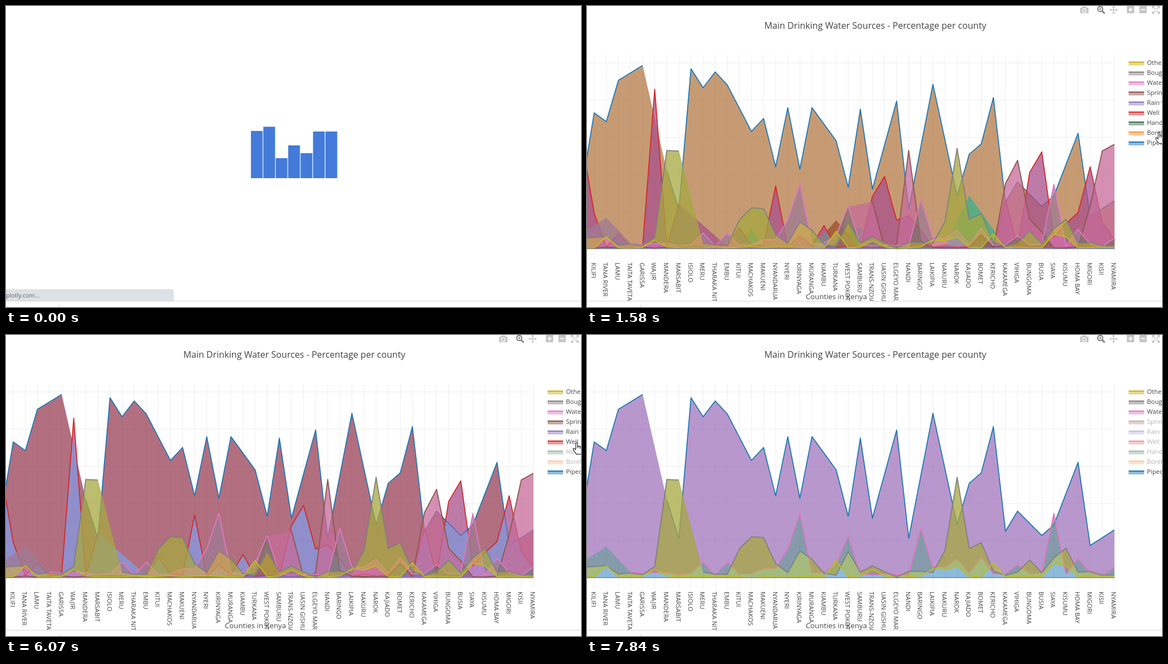
An HTML page with a canvas that plays this animation: 1033 px wide and 542 px high, repeating every 8000 ms.

```html
<!DOCTYPE html>
<html lang="en">
<head>
<meta charset="utf-8">
<title>Drinking water chart</title>
<style>
html, body { margin: 0; width: 100%; height: 100%; overflow: hidden; background: #fff; }
canvas { display: block; width: 1033px; height: 542px; }
</style>
</head>
<body>
<canvas id="stage"></canvas>
<script>
const W = 1033, H = 542, LOOP = 8000;
const BASE = 437, UNIT = 3.35, RIGHT = 948;
const OPEN = '"Open Sans", sans-serif';
const ARIAL = '"Liberation Sans", Arial, sans-serif';

const canvas = document.getElementById('stage');
const dpr = window.devicePixelRatio || 1;
canvas.width = W * dpr;
canvas.height = H * dpr;
const c = canvas.getContext('2d');

const counties = ('KWALE,KILIFI,TANA RIVER,LAMU,TAITA TAVETA,GARISSA,WAJIR,MANDERA,MARSABIT,ISIOLO,MERU,' +
  'THARAKA NITHI,EMBU,KITUI,MACHAKOS,MAKUENI,NYANDARUA,NYERI,KIRINYAGA,MURANGA,KIAMBU,TURKANA,' +
  'WEST POKOT,SAMBURU,TRANS-NZOIA,UASIN GISHU,ELGEYO MARAKWET,NANDI,BARINGO,LAIKIPIA,NAKURU,NAROK,' +
  'KAJIADO,BOMET,KERICHO,KAKAMEGA,VIHIGA,BUNGOMA,BUSIA,SIAYA,KISUMU,HOMA BAY,MIGORI,KISII,NYAMIRA').split(',');
const px = i => 13 + 21.73 * (i - 1);
const py = v => BASE - UNIT * v;
const _ = null;

let seed = 7;
function random() {
  seed = seed * 16807 % 2147483647;
  return seed / 2147483647;
}

// Percentages per county: straight runs between turning points.
function joined(turns) {
  const at = Object.keys(turns).map(Number);
  return counties.map((name, i) => {
    if (i in turns) return turns[i];
    const a = at.filter(k => k < i).pop(), b = at.find(k => k > i);
    return turns[a] + (turns[b] - turns[a]) * (i - a) / (b - a);
  });
}

// Percentages per county: a low random level with a few peaks; null is a missing value.
const peaked = (level, peaks) =>
  counties.map((name, i) => i in peaks ? peaks[i] : level * (0.5 + random()));

const piped = joined({ 0: 34, 1: 73, 2: 68.3, 3: 90.5, 5: 98.5, 6: _, 7: 41.8, 8: 21, 9: 96.7, 10: 86.5, 11: 95,
  12: 88, 14: 63, 15: 70, 16: 44, 17: 75.8, 18: 42.7, 19: 75.8, 21: 58, 22: 33, 23: 75, 24: 32, 26: 79.36, 27: 21.2,
  29: 88.4, 31: 28.4, 32: 50.7, 33: 56.4, 34: 81.2, 35: 25, 36: 35.8, 38: 22.7, 39: 28.4, 41: 62, 42: 17.3, 44: 25.7 });
const borehole = peaked(0.8, { 14: 12, 20: _, 21: _, 22: _, 23: 11.5, 24: _, 26: _, 31: _, 32: 28.7, 33: _, 34: _ });
const handpump = peaked(0.5, { 20: _, 21: 15.3, 22: _, 26: _ });
const well = peaked(1.3, { 0: 57, 1: 19, 3: 8, 6: 85.7, 8: 24, 9: _, 10: _, 11: _, 13: 11.3, 16: 33.7, 18: 7, 20: 12.5,
  24: 28, 25: 38.8, 26: 15.31, 27: 17.6, 28: 10, 33: 7.8, 35: 26.6, 37: 41, 38: 52, 39: 6, 40: 13.4, 41: 19.4, 42: 44, 43: 14, 44: 5 });
const rain = peaked(0.5, { 26: 0.71 });
const spring = peaked(0.6, { 21: 2.7, 22: 22.4, 23: _, 24: 25.4, 26: 2.49, 27: 52.8, 28: 4, 33: 7.5,
  35: 35, 36: 47.5, 37: 15.8, 38: 9, 42: 23, 43: 52.5, 44: 56.1 });
const water = peaked(2, { 0: 8.4, 1: _, 2: 16.7, 3: _, 10: 8.4, 12: 8.4, 15: 4.8, 16: 5, 17: 15.5, 18: 34.6, 21: 7.5,
  22: 22.7, 26: 1.75, 28: 26.6, 29: 5.7, 30: 5.7, 31: 10, 33: 11, 36: 7, 39: 34.6, 41: 10.4, 44: 5.7 });
const bought = peaked(2.4, { 0: 5.7, 1: 6, 2: 6.5, 6: 6, 7: 52.8, 8: 52.5, 9: _, 13: 15.5, 14: 22, 15: 21.5, 16: 7.5,
  18: 14.3, 19: 10, 22: 14, 24: 6.3, 26: 0.36, 30: 14.6, 31: 54, 32: 15.8, 33: 18.8, 37: 9.5, 39: 10.7, 40: 15.8 });
const other = peaked(0.7, { 2: 6.5, 6: 4.5, 21: 9.3, 24: 4.2, 26: 0.02, 29: 4.8, 30: 4.2, 31: 6.3, 34: 8, 39: 7.8, 40: 6.3 });

// off: moment the trace is switched off in the legend
const trace = (name, color, key, data, off = Infinity) => ({ name, color, key, data, off });
const traces = [
  trace('Piped water', '#1f77b4', '#1f77b4', piped),
  trace('Borehole', '#ff7f0e', '#f5913c', borehole, 1730),
  trace('Handpump', '#2ca02c', '#3f6f52', handpump, 5490),
  trace('Well', '#d62728', '#d62f2f', well, 6230),
  trace('Rain water', '#9467bd', '#8d78c0', rain, 6850),
  trace('Spring', '#8c564b', '#8c564b', spring, 7350),
  trace('Water bodies', '#e377c2', '#dd7cc4', water),
  trace('Bought from vendors', '#7f7f7f', '#8a8088', bought),
  trace('Other', '#bcbd22', '#cdb01e', other)
];

const move = (kind, from, to, start, end) => ({ kind, from, to, start, end });
const moves = [
  move('cross', 630, 1180, [600, 250], [906, 312]),
  move('hand', 1460, 1780, [1021, 226], [1021, 226]),
  move('arrow', 1780, 1920, [1021, 226], [1021, 311]),
  move('none', 5140, 5490, [0, 0], [0, 0]),
  move('hand', 5490, 7060, [1016, 213], [1023, 153]),
  move('hand', 7500, 7790, [1025, 146], [1025, 136]),
  move('none', 7840, LOOP, [0, 0], [0, 0])
];

// The screen refreshes in short steps.
const tick = t => 60 + 70 * Math.floor((t - 60) / 70);
const ramp = (t, a, b) => Math.max(0, Math.min(1, (t - a) / (b - a)));

function text(s, x, y, size, color, o = {}) {
  c.font = `${o.weight || 400} ${size}px ${o.font || OPEN}`;
  c.textAlign = o.align || 'left';
  c.textBaseline = o.base || 'alphabetic';
  c.fillStyle = color;
  c.fillText(s, x, y);
}

function rect(x, y, w, h, color) {
  c.fillStyle = color;
  c.fillRect(x, y, w, h);
}

function poly(points, fill, stroke, width = 1) {
  c.beginPath();
  points.forEach(p => c.lineTo(p[0], p[1]));
  c.closePath();
  if (fill) { c.fillStyle = fill; c.fill(); }
  if (stroke) { c.strokeStyle = stroke; c.lineWidth = width; c.stroke(); }
}

function lines(list, color, width) {
  c.beginPath();
  list.forEach(([x1, y1, x2, y2]) => { c.moveTo(x1, y1); c.lineTo(x2, y2); });
  c.strokeStyle = color;
  c.lineWidth = width;
  c.stroke();
}

function loader() {
  [85, 92.5, 36, 59, 45, 84, 84].forEach((h, i) => {
    const x = 440 + i * 22.33;
    rect(x, 310 - h, 21.8, h, '#b9def3');
    rect(x, 310 - h, 20.8, h, '#447ad9');
  });
  c.beginPath();
  c.roundRect(-5, 510, 306.5, 21, [0, 4, 0, 0]);
  c.fillStyle = '#dee1e6';
  c.fill();
  text('plotly.com...', 0, 525, 10.7, '#5f6368');
}

function grid() {
  const list = [];
  for (let i = 1; i < counties.length; i++) list.push([px(i), 88, px(i), 456]);
  for (let k = 0; k < 6; k++) list.push([0, 102.5 + 67 * k, RIGHT, 102.5 + 67 * k]);
  lines(list, '#eeeeee', 1);
}

const points = data => data.map((v, i) => v === null ? null : [px(i), py(v)]).filter(Boolean);

function area(top, bottom, color) {
  c.globalAlpha = 0.5;
  poly(points(top).concat(points(bottom).reverse()), color);
  c.globalAlpha = 1;
}

function curve(tr) {
  c.beginPath();
  let pen = false;
  tr.data.forEach((v, i) => {
    if (v !== null) c[pen ? 'lineTo' : 'moveTo'](px(i), py(v));
    pen = v !== null;
  });
  c.strokeStyle = tr.color;
  c.lineWidth = 1.8;
  c.stroke();
}

function plot(shown) {
  c.save();
  c.beginPath();
  c.rect(0, 87, RIGHT, 370);
  c.clip();
  area(shown[0].data, counties.map(() => 0), shown[0].color);
  shown.forEach((tr, k) => {
    const next = shown[k + 1];
    if (next) area(tr.data, next.data, next.color);
    curve(tr);
  });
  rect(0, BASE - 0.5, RIGHT, 1, '#66667a');
  c.restore();
}

function labels() {
  text('Main Drinking Water Sources - Percentage per county', 518, 41, 16.07, '#444', { align: 'center' });
  c.save();
  c.beginPath();
  c.rect(0, 450, W, 81);
  c.clip();
  for (let i = 1; i < counties.length; i++) {
    c.save();
    c.translate(px(i) - 5.3, 462);
    c.rotate(Math.PI / 2);
    text(counties[i], 0, 0, 11.3, '#444');
    c.restore();
  }
  text('Counties in Kenya', 448, 528, 13.2, '#444', { align: 'center' });
  c.restore();
}

function legend(t) {
  traces.forEach((tr, k) => {
    const y = 246 - 18 * k, hidden = t >= tr.off;
    c.globalAlpha = hidden ? 0.25 : 0.5;
    rect(973, y - 1, 28, 6, tr.key);
    c.globalAlpha = hidden ? 0.4 : 1;
    rect(973, y - 2, 28, 2, tr.key);
    text(tr.name, 1006, y + 4.3, 11.3, '#444');
    c.globalAlpha = 1;
  });
}

function ring(x, y, r, color, width) {
  c.beginPath();
  c.arc(x, y, r, 0, 7);
  c.strokeStyle = color;
  c.lineWidth = width;
  c.stroke();
}

function modebar() {
  const pale = '#c4c4c4', dark = '#7c7c7c';
  // camera
  rect(886, 3, 15, 10, pale);
  rect(890, 1, 7, 3, pale);
  ring(893.5, 8, 3.2, '#fff', 1.4);
  // magnifier
  ring(922, 5.5, 4.6, dark, 2);
  lines([[925.5, 9, 930, 13.5]], dark, 2.6);
  lines([[919.5, 5.5, 924.5, 5.5], [922, 3, 922, 8]], dark, 1.2);
  // pan
  lines([[940, 7, 952, 7], [946, 1, 946, 13]], pale, 1.5);
  for (let k = 0; k < 4; k++) {
    c.save();
    c.translate(946, 7);
    c.rotate(k * Math.PI / 2);
    poly([[7.5, 0], [4.5, -2.8], [4.5, 2.8]], pale);
    c.restore();
  }
  // zoom in and out
  [970, 992.5].forEach((x, k) => {
    rect(x, 0, 13, 13, pale);
    rect(x + 3, 5.5, 7, 2, '#fff');
    if (!k) rect(x + 5.5, 3, 2, 7, '#fff');
  });
  // autoscale
  c.save();
  c.translate(1022, 7);
  for (let k = 0; k < 4; k++) {
    poly([[7, -7], [2, -7], [7, -2]], pale);
    lines([[1, -1, 5, -5]], pale, 1.6);
    c.rotate(Math.PI / 2);
  }
  c.restore();
}

// Stack overlapping labels around their mean height.
function spread(items, gap) {
  const groups = items.map(it => ({ list: [it], y: it.y }));
  for (let k = 1; k < groups.length;) {
    const a = groups[k - 1], b = groups[k];
    const list = a.list.concat(b.list);
    if (b.y - a.y >= gap * list.length / 2) { k++; continue; }
    groups.splice(k - 1, 2, { list, y: list.reduce((s, it) => s + it.y, 0) / list.length });
    k = Math.max(1, k - 1);
  }
  groups.forEach(g => g.list.forEach((it, n) => { it.ly = g.y + gap * (n - (g.list.length - 1) / 2); }));
}

function hover(i, shown) {
  const x = px(i), size = 12.25, o = { font: ARIAL, base: 'middle' };
  c.font = `${size}px ${ARIAL}`;
  const half = c.measureText(counties[i]).width / 2 + 4;
  poly([[x, 456], [x + 5, 461], [x + half, 461], [x + half, 481], [x - half, 481], [x - half, 461], [x - 5, 461]], '#444', '#fff');
  text(counties[i], x, 471.5, size, '#fff', { ...o, align: 'center' });

  const items = shown.filter(tr => tr.data[i] !== null)
    .map(tr => ({ tr, y: py(tr.data[i]) }))
    .sort((a, b) => a.y - b.y);
  spread(items, 20);
  for (const { tr, y, ly } of items) {
    const value = tr.data[i].toFixed(2);
    const name = tr.name.length > 15 ? tr.name.slice(0, 12) + '...' : tr.name;
    c.font = `${size}px ${ARIAL}`;
    const near = x + 6, far = near + c.measureText(value).width + 6;
    const nw = c.measureText(name).width + 8;
    rect(far, ly - 10, nw, 20, 'rgba(255,255,255,0.8)');
    poly([[x, y], [near, ly - 5], [near, ly - 9.5], [far, ly - 9.5], [far, ly + 9.5], [near, ly + 9.5], [near, ly + 5]],
      tr.color, '#fff', 1.2);
    const light = tr.color === '#e377c2' || tr.color === '#bcbd22';
    text(value, (near + far) / 2, ly + 0.5, size, light ? '#444' : '#fff', { ...o, align: 'center', weight: light ? 400 : 700 });
    text(name, far + 4, ly + 0.5, size, tr.color, o);
  }
}

function notice(t) {
  c.globalAlpha = ramp(t, 1720, 1920) * (1 - ramp(t, 5160, 5300));
  rect(975, 42, 180, 55, 'rgba(140,151,175,0.9)');
  text('Double-click on legend to', 984, 65, 12.3, '#fff', { weight: 600 });
  text('isolate one trace', 984, 83, 12.3, '#fff', { weight: 600 });
  c.globalAlpha = 1;
}

function drawPointer(t) {
  const m = moves.filter(m => m.from <= t).pop();
  if (!m || m.kind === 'none') return;
  const f = Math.max(0, (tick(t) - m.from) / (m.to - m.from));
  // The cross glides on while the page is still catching up.
  const k = m.kind === 'cross' ? f : Math.min(1, f);
  c.save();
  c.translate(m.start[0] + (m.end[0] - m.start[0]) * k, m.start[1] + (m.end[1] - m.start[1]) * k);
  if (m.kind === 'cross') {
    lines([[-11, 0, 11, 0], [0, -11, 0, 11]], '#2b3a36', 1.4);
  } else if (m.kind === 'arrow') {
    poly([[0.5, 0.5], [0.5, 14.5], [4, 11.5], [6.5, 17.5], [9, 16.5], [6.5, 10.5], [11, 10.5]], '#fff', '#333');
  } else {
    poly([[5, 1.5], [6.5, 0.5], [8, 1.5], [8, 7], [11, 7], [14, 8], [17, 9.5], [17, 15], [15, 21.5], [6.5, 21.5],
      [1, 14], [0.5, 11.5], [2.5, 11], [5, 13.5]], '#fff', '#222', 1.1);
    lines([[8, 7, 8, 11], [11, 7.5, 11, 11], [14, 8.5, 14, 12]], '#222', 1);
  }
  c.restore();
}

function draw(t) {
  c.setTransform(dpr, 0, 0, dpr, 0, 0);
  c.lineJoin = 'round';
  rect(0, 0, W, H, '#fff');
  rect(0, 531, W, 1, '#d9d9d9');
  rect(95.5, 538, 1, 4, '#cfcfcf');
  if (t < 230) { loader(); return; }
  const shown = traces.filter(tr => t < tr.off);
  grid();
  plot(shown);
  labels();
  legend(t);
  if (t >= 630) modebar();
  if (t >= 630 && t < 1460) hover(Math.floor(13 + 0.024 * Math.max(0, tick(t) - 630)), shown);
  notice(t);
  drawPointer(t);
}

const start = performance.now();
function frame() {
  draw((performance.now() - start) % LOOP);
  requestAnimationFrame(frame);
}
frame();
</script>
</body>
</html>
```
